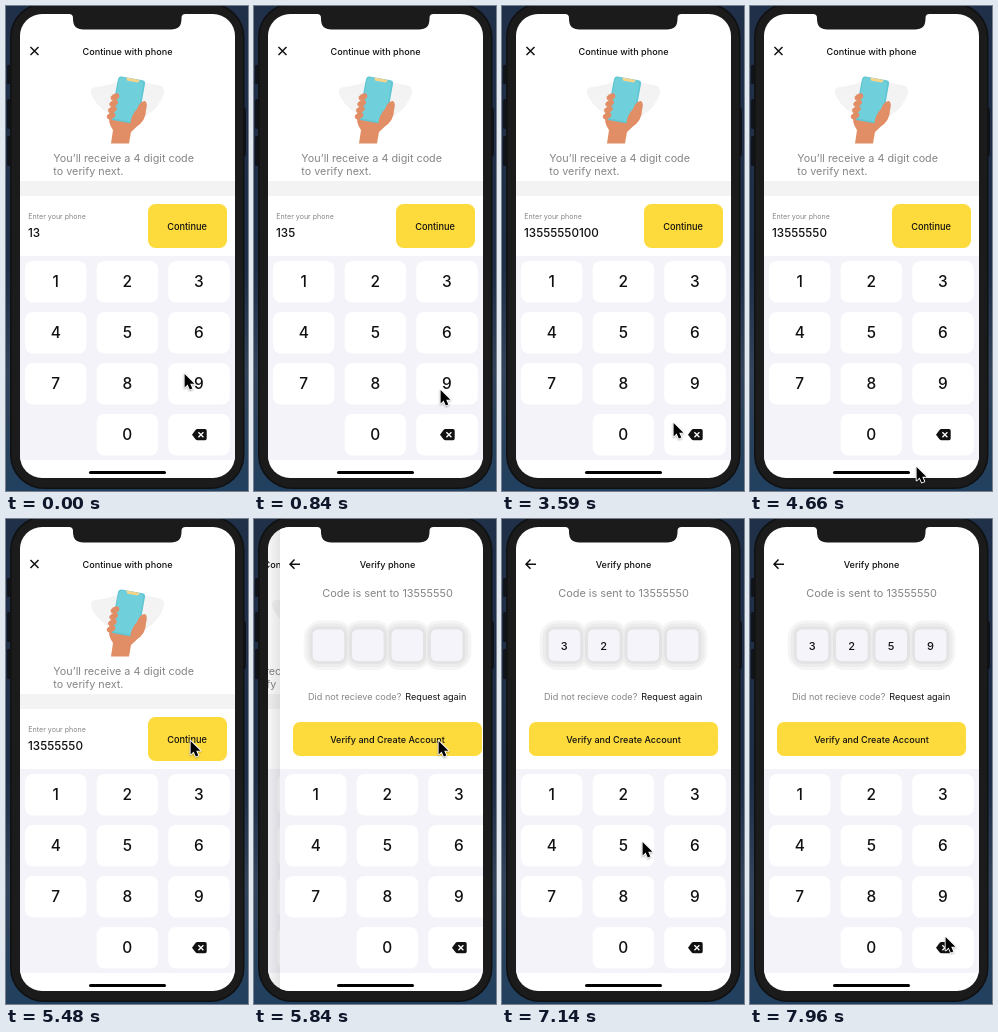
Recreate the animation shown at these times as an HTML page with a canvas. Size 242 by 485 pixels, loop 8000 ms.

```html
<!DOCTYPE html>
<html lang="en">
<head>
<meta charset="utf-8">
<title>Phone sign-up</title>
<style>
html, body { margin: 0; width: 100%; height: 100%; overflow: hidden; background: #1d2a42; }
canvas { display: block; width: 242px; height: 485px; }
</style>
</head>
<body>
<canvas id="stage"></canvas>
<script>
const W = 242, H = 485, LOOP = 8000, LAST_TICK = 67;
const canvas = document.getElementById('stage');
const ctx = canvas.getContext('2d');
const scale = Math.max(1, window.devicePixelRatio || 1);
canvas.width = W * scale;
canvas.height = H * scale;

const INK = '#111111', GRAY = '#858587', YELLOW = '#fedb3d', PAD = '#f3f3f9';
const BODY = '#1b1b1b', SKIN = '#e18d66';
const NUMBER = '13555550100';
const TYPED = [4, 11, 13, 15, 17, 21, 23, 25, 27];
const ERASED = [33, 35, 37];
const CODE = '3259';
const CODE_TYPED = [54, 59, 62, 66];
const SLIDE_TICK = 49;

// Pointer path: tick, x, y
const PATH = [
  [0, 177, 367], [2, 120, 378], [5, 120, 378], [7, 185, 383], [8, 201, 382],
  [10, 200, 382], [11, 197, 382], [17, 197, 382], [19, 35, 380], [21, 36, 381],
  [27, 36, 381], [28, 62, 390], [30, 170, 416], [31, 186, 423], [37, 186, 423],
  [39, 165, 460], [40, 160, 466], [41, 172, 430], [43, 186, 313], [44, 195, 270],
  [46, 183, 221], [51, 183, 221], [53, 175, 262], [54, 172, 268], [55, 172, 268],
  [57, 139, 269], [59, 139, 269], [60, 139, 322], [62, 139, 322], [64, 179, 371],
  [66, 179, 371], [67, 194, 417]
];

// Ticks start at 120 ms and shorten slightly over the loop.
function tickAt(ms) {
  let n = LAST_TICK;
  while (n > 0 && 120 * n - 0.0178 * n * n > ms + 8) n--;
  return n;
}

const passed = (ticks, n) => ticks.filter(t => t <= n).length;

function pointerAt(n) {
  const i = PATH.findIndex(p => p[0] >= n);
  if (i <= 0) return PATH[0].slice(1);
  const [t0, x0, y0] = PATH[i - 1], [t1, x1, y1] = PATH[i];
  const k = (n - t0) / (t1 - t0);
  return [x0 + (x1 - x0) * k, y0 + (y1 - y0) * k];
}

function rect(x, y, w, h, r, color) {
  ctx.fillStyle = color;
  ctx.beginPath();
  ctx.roundRect(x, y, w, h, r);
  ctx.fill();
}

function text(str, x, y, size, weight = 400, color = INK, align = 'left') {
  ctx.font = `${weight} ${size}px Inter, Roboto, sans-serif`;
  ctx.fillStyle = color;
  ctx.textAlign = align;
  ctx.fillText(str, x, y);
}

function shape(d, color) {
  ctx.fillStyle = color;
  ctx.fill(new Path2D(d));
}

function line(d, color, width) {
  ctx.strokeStyle = color;
  ctx.lineWidth = width;
  ctx.stroke(new Path2D(d));
}

function drawBody() {
  const wall = ctx.createLinearGradient(0, 0, 0, H);
  wall.addColorStop(0, '#1f3048');
  wall.addColorStop(0.55, '#1f2f47');
  wall.addColorStop(0.76, '#33445b');
  wall.addColorStop(1, '#21405f');
  ctx.fillStyle = wall;
  ctx.fillRect(0, 0, W, H);
  for (const [y, h] of [[59, 19], [93, 30], [130, 30]]) rect(1, y, 5, h, 1.5, '#11141b');
  rect(236, 102, 4, 48, 1.5, '#11141b');
  rect(4, -3, 234.5, 486, 34, '#101113');
  rect(5.5, -1.5, 231.5, 483, 33, BODY);
}

function drawHand() {
  shape('M85 87 Q84 82 90 81 Q106 79 119 72 Q135 76 152 79 Q159 80 158 87 Q154 101 140 110 Q121 120 103 108 Q88 98 85 87Z', '#f3f3f3');
  shape('M105 137.5 L107 124 Q101 116 104 106 L122 108 L139 99 Q142 111 125 126 L123 137.5Z', SKIN);
  shape('M115.5 70.5 L136.5 74.3 Q139.6 75 139 78 L132.4 115 Q131.6 118.5 128 118 L107.5 114.2 Q104.3 113.5 105 110 L112 73 Q112.6 70 115.5 70.5Z', '#62c5d2');
  shape('M116 71.8 L135.5 75.2 Q137.6 75.8 137.2 78 L130.8 114 Q130.3 116.5 128 116.2 L108.5 112.8 Q106.3 112.2 106.6 110 L113 73.8 Q113.6 71.3 116 71.8Z', '#6fd0dc');
  shape('M120 71.4 L134 73.9 L131.8 76.5 L121.5 74.8Z', '#f5d48a');
  ctx.fillStyle = SKIN;
  for (let i = 0; i < 4; i++) {
    ctx.beginPath();
    ctx.ellipse(109 - i * 1.3, 91 + i * 6.3, 4.6, 3, -0.5, 0, Math.PI * 2);
    ctx.fill();
  }
  shape('M124 119 Q125 109 131 103 Q134 95 139 95 Q142 97 140 104 Q140 115 130 121 L123 127Z', SKIN);
}

function drawKeypad() {
  ctx.fillStyle = PAD;
  ctx.fillRect(14, 250, 215, 204);
  ['1', '2', '3', '4', '5', '6', '7', '8', '9', '', '0', '<'].forEach((key, i) => {
    if (!key) return;
    const x = 19 + (i % 3) * 71.6, y = 255 + Math.floor(i / 3) * 51;
    rect(x, y, 61.5, 41.5, 8, '#fff');
    if (key !== '<') {
      text(key, x + 30.7, y + 26.2, 15.4, 500, INK, 'center');
      return;
    }
    shape('M186 428.7 L189.5 424 Q190.3 423 191.5 423 H199 Q200.7 423 200.7 424.7 V432.6 Q200.7 434.3 199 434.3 H191.5 Q190.3 434.3 189.5 433.3Z', INK);
    line('M192.4 426.2 L197.4 431.2 M197.4 426.2 L192.4 431.2', '#fff', 1.3);
  });
}

function drawPhonePage(n) {
  ctx.fillStyle = '#fff';
  ctx.fillRect(14, 8, 215, 464);
  line('M24.5 41 L32.5 49 M32.5 41 L24.5 49', INK, 1.5);
  text('Continue with phone', 121.5, 48.6, 9.1, 500, INK, 'center');
  drawHand();
  text('You’ll receive a 4 digit code', 47.3, 156.1, 10.8, 400, GRAY);
  text('to verify next.', 47.3, 169.2, 10.8, 400, GRAY);
  ctx.fillStyle = '#f3f3f3';
  ctx.fillRect(14, 175, 215, 15);
  text('Enter your phone', 22.3, 213.2, 7.1, 400, GRAY);
  const count = 2 + passed(TYPED, n) - passed(ERASED, n);
  text(NUMBER.slice(0, count), 22, 230.8, 11.7, 500);
  rect(142, 198, 79, 44, 7.5, YELLOW);
  text('Continue', 181, 223.5, 9.2, 500, INK, 'center');
  drawKeypad();
}

function drawVerifyPage(n) {
  ctx.fillStyle = '#fff';
  ctx.fillRect(14, 8, 215, 464);
  line('M34 45.2 H24 M28.5 40.6 L24 45.2 L28.5 49.8', INK, 1.5);
  text('Verify phone', 121.5, 48.6, 9.1, 500, INK, 'center');
  text('Code is sent to ' + NUMBER.slice(0, 8), 121.5, 78, 10.9, 400, GRAY, 'center');
  const boxes = [0, 1, 2, 3].map(i => 46.7 + i * 39.4);
  for (const [grow, color] of [[9, '#f5f5f5'], [6, '#ececec'], [3, '#e3e3e4']]) {
    for (const x of boxes) rect(x - grow, 110.5 - grow, 31.5 + 2 * grow, 31.5 + 2 * grow, 5 + grow * 1.4, color);
  }
  const count = passed(CODE_TYPED, n);
  boxes.forEach((x, i) => {
    rect(x, 110.5, 31.5, 31.5, 5, '#f4f4fa');
    if (i < count) text(CODE[i], x + 15.6, 130.5, 11, 500, INK, 'center');
  });
  text('Did not recieve code?', 42, 181, 9.1, 400, GRAY);
  text('Request again', 139.3, 181, 9.1);
  rect(27, 203, 189, 34, 7, YELLOW);
  text('Verify and Create Account', 121.5, 223.5, 9.1, 500, INK, 'center');
  drawKeypad();
}

function shifted(dx, draw) {
  ctx.save();
  ctx.translate(dx, 0);
  draw();
  ctx.restore();
}

function drawSlide(n) {
  shifted(-67, () => drawPhonePage(n));
  const shade = ctx.createLinearGradient(14, 0, 26, 0);
  shade.addColorStop(0, 'rgba(0,0,0,.03)');
  shade.addColorStop(1, 'rgba(0,0,0,.1)');
  ctx.fillStyle = shade;
  ctx.fillRect(14, 8, 12, 464);
  shifted(12, () => drawVerifyPage(n));
}

function drawScreen(n) {
  ctx.save();
  ctx.beginPath();
  ctx.roundRect(14, 8, 215, 464, 22);
  ctx.clip();
  if (n < SLIDE_TICK) drawPhonePage(n);
  else if (n === SLIDE_TICK) drawSlide(n);
  else drawVerifyPage(n);
  ctx.restore();
  shape('M63 7 V8 Q67 8 67 12 V13 Q67 23.5 77.5 23.5 H165 Q175.5 23.5 175.5 13 V12 Q175.5 8 179.5 8 V7Z', BODY);
  rect(83, 465, 77, 3, 1.5, '#000');
}

function drawPointer([x, y]) {
  ctx.save();
  ctx.translate(x + 1.6, y + 1);
  ctx.lineJoin = 'round';
  const d = 'M0 0 V13.4 L3 10.5 L5.2 15.5 L7.7 14.4 L5.6 9.7 H9.8Z';
  ctx.shadowColor = 'rgba(0,0,0,.3)';
  ctx.shadowBlur = 2 * scale;
  ctx.shadowOffsetY = scale;
  line(d, '#fff', 1.8);
  ctx.shadowColor = 'transparent';
  shape(d, '#000');
  ctx.restore();
}

const start = performance.now();

function frame() {
  const n = tickAt((performance.now() - start) % LOOP);
  ctx.setTransform(scale, 0, 0, scale, 0, 0);
  drawBody();
  drawScreen(n);
  drawPointer(pointerAt(n));
  requestAnimationFrame(frame);
}

frame();
</script>
</body>
</html>
```
